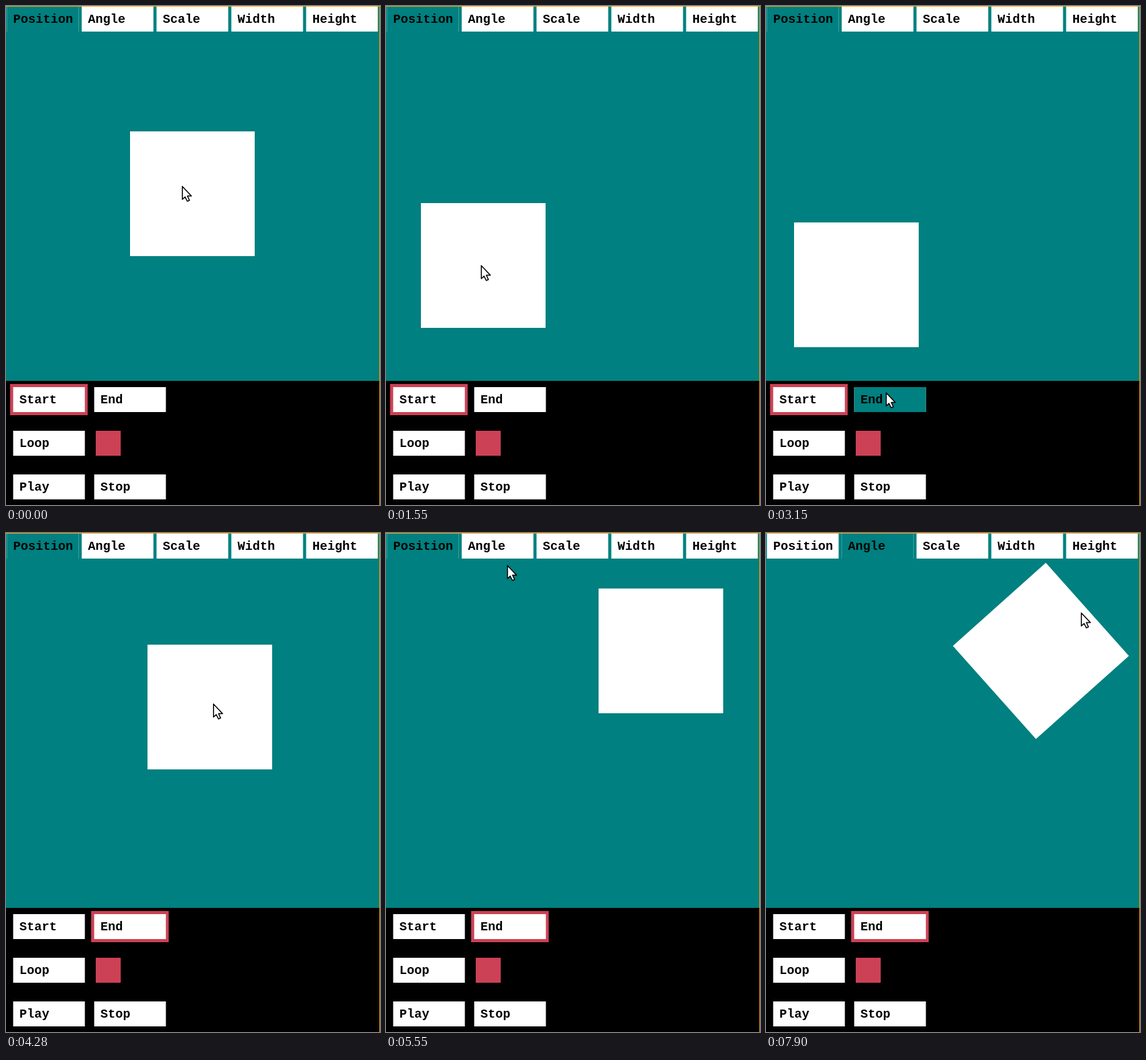
These frames come from a looping animation (600x800 px, 8 s). An HTML page:

```html
<!DOCTYPE html>
<html lang="en">
<head>
<meta charset="utf-8">
<title>Shape editor</title>
<style>
  html, body { margin: 0; width: 100%; height: 100%; overflow: hidden; background: #008080; }
  svg { display: block; width: 600px; height: 800px; }
  text { font: bold 20px "Liberation Mono", "Courier New", monospace; white-space: pre; }
</style>
</head>
<body>
<svg viewBox="0 0 600 800">
  <rect width="600" height="800" fill="#008080"/>
  <g id="tabs"></g>
  <rect id="square" x="-100" y="-100" width="200" height="200" fill="#fff"/>
  <rect y="601" width="600" height="199" fill="#000"/>
  <rect id="ring" y="606" width="124.5" height="50" fill="#cc4155"/>
  <g id="buttons"></g>
  <rect x="144" y="681" width="40" height="40" fill="#cc4155"/>
  <path d="M0 .5H599.5V800" fill="none" stroke="#ffa500"/>
  <g id="cursor" stroke-linejoin="round">
    <path d="M1 2V22.5L5.5 18.5L9 25.5L12.5 24L9.5 17H16Z" fill="#000" stroke="#000" stroke-width="2" opacity=".16"/>
    <path d="M.9 1.2V22L5.3 18L8.8 25L12.2 23.5L9 16.5H15.3Z" fill="#fff" stroke="#000" stroke-width="1.6"/>
  </g>
</svg>
<script>
const LOOP = 8000, STEP = 92, TRAIL = 0.016;
const NS = "http://www.w3.org/2000/svg";
const el = id => document.getElementById(id);

const smooth = p => p * p * (3 - 2 * p);
const dash = p => 1 - (1 - p) ** 2.95;

// Pointer gestures; a bend bows the straight path sideways
const home = { x: 284, y: 291 };
const moves = [
  { start: 900, end: 1700, x: 139, y: 433 },
  { start: 1780, end: 2050, x: 145, y: 447 },
  { start: 2600, end: 2780, x: 160, y: 543 },
  { start: 2950, end: 3150, x: 194, y: 622 },
  { start: 3450, end: 3630, x: 302, y: 393 },
  { start: 3800, end: 4000, ...home },
  { start: 4280, end: 5080, x: 441, y: 189, ease: dash, bend: 19 },
  { start: 5180, end: 5930, x: 180, y: 27, ease: dash, bend: -44 },
  { start: 6030, end: 6780, x: 469, y: 117 },
  { start: 7150, end: 7900, x: 507, y: 130 }
];

// The screen refreshes in even steps, the first one already under way
function progress({ start, end }, t) {
  const gaps = Math.round((end - start) / STEP);
  const k = Math.floor((t - start) / (end - start) * gaps + 0.1);
  return Math.min(1, (k + 1) / (gaps + 1));
}

function pointerAt(t, trail = 0) {
  const i = moves.findLastIndex(move => move.start <= t);
  if (i < 0) return home;
  const from = moves[i - 1] || home;
  const { x, y, ease = smooth, bend = 0 } = moves[i];
  const p = progress(moves[i], t);
  const s = ease(p < 1 ? p - trail : 1);
  const dx = x - from.x, dy = y - from.y;
  const bow = 4 * s * (1 - s) * bend / Math.hypot(dx, dy);
  return { x: from.x + dx * s - dy * bow, y: from.y + dy * s + dx * bow };
}

function squareAt(t) {
  const dragged = until => ({ ...pointerAt(Math.min(t, until), TRAIL), angle: 0 });
  if (t >= 900 && t < 3450) return dragged(2050);
  if (t < 4280) return { x: 299, y: 301, angle: 0 };
  if (t < 7150) return dragged(5080);
  const { x, y } = pointerAt(t, TRAIL);
  return { x: 441, y: 189, angle: Math.atan2(y - 189, x - 441) * 180 / Math.PI + 90 };
}

function add(group, name, attrs) {
  const node = document.createElementNS(NS, name);
  for (const key in attrs) node.setAttribute(key, attrs[key]);
  return el(group).appendChild(node);
}

function addButton(group, label, x, y) {
  const size = { x, y, width: 115, height: 40 };
  add(group, "rect", { ...size, fill: "#fff" });
  const tint = add(group, "rect", { ...size, fill: "#008080" });
  add(group, "text", { x: x + 10, y: y + 26 }).textContent = label;
  return { tint, x, y };
}

const tabs = ["Position", "Angle", "Scale", "Width", "Height"]
  .map((label, i) => addButton("tabs", label, 1.5 + 120 * i, 1));
const buttons = [["Start", "End"], ["Loop"], ["Play", "Stop"]].flatMap((row, r) =>
  row.map((label, c) => addButton("buttons", label, 11.5 + 130 * c, 611 + 70 * r)));

function paint({ tint, x, y }, active, pointer) {
  const px = pointer.x - x, py = pointer.y - y;
  const hover = px >= 0 && px <= 115 && py >= 0 && py <= 40;
  tint.setAttribute("visibility", active || hover ? "visible" : "hidden");
}

const place = (id, x, y, angle = 0) =>
  el(id).setAttribute("transform", `translate(${Math.round(x)} ${Math.round(y)}) rotate(${angle})`);

function draw(t) {
  const pointer = pointerAt(t);
  const { x, y, angle } = squareAt(t);
  place("square", x, y, angle);
  place("cursor", pointer.x - 2, pointer.y - 3);
  el("ring").setAttribute("x", t < 3450 ? 6.5 : 136.5);
  const current = t < 6030 ? 0 : 1;
  tabs.forEach((tab, i) => paint(tab, i === current, pointer));
  buttons.forEach(button => paint(button, false, pointer));
}

const begin = performance.now();
function frame() {
  draw((performance.now() - begin) % LOOP);
  requestAnimationFrame(frame);
}
frame();
</script>
</body>
</html>
```
